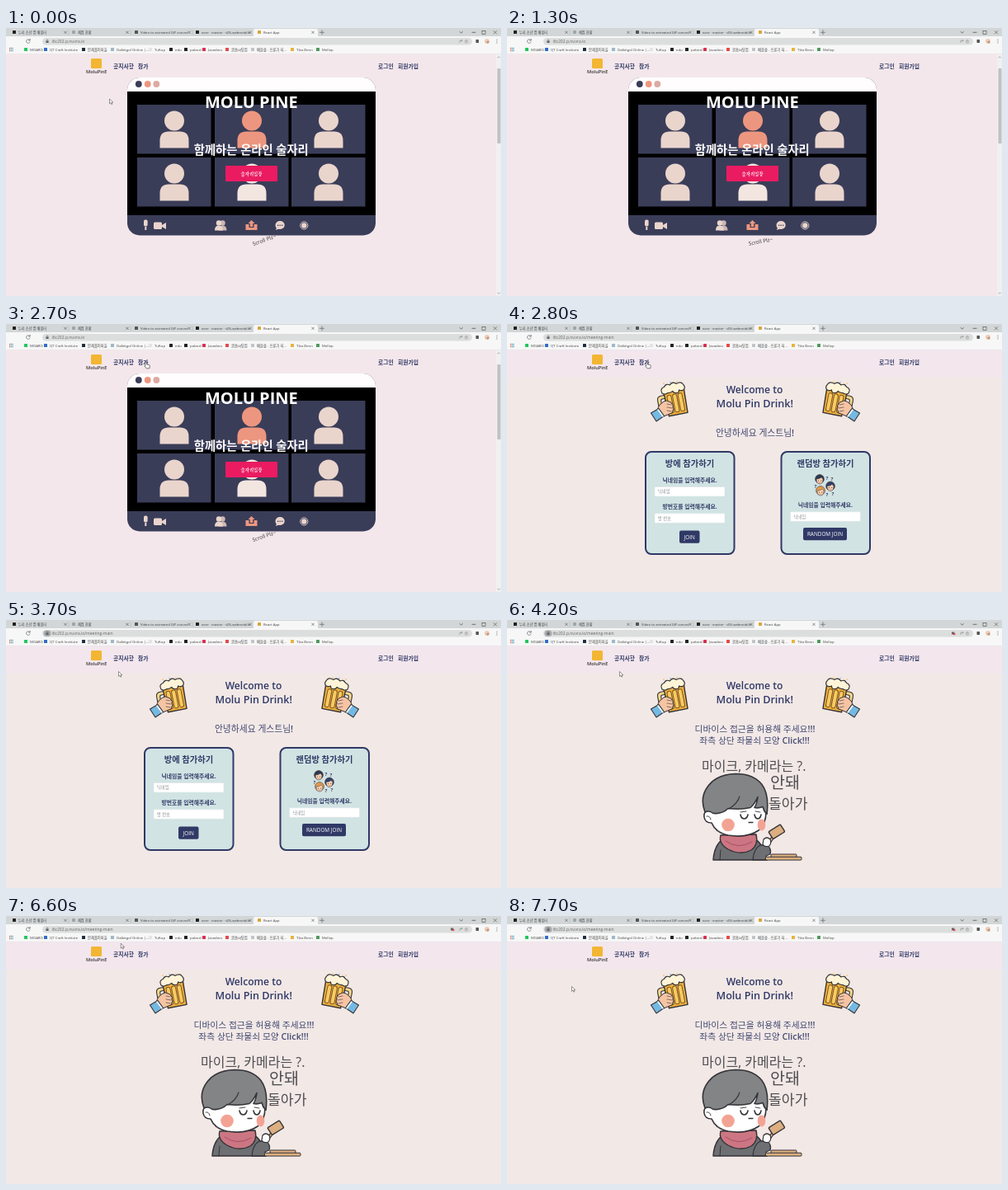
Write an HTML page that moves like this. It is 600 by 325 pixels and loops after 8 s.

```html
<!DOCTYPE html>
<html lang="ko">
<head>
<meta charset="utf-8">
<title>Online party</title>
<style>
html, body { margin: 0; width: 100%; height: 100%; overflow: hidden; background: #f4e7ea; }
svg { display: block; width: 600px; height: 325px; }
text { font-family: "Open Sans", "Noto Sans CJK KR", "Noto Sans CJK JP", "Noto Sans CJK", sans-serif; }
.m { text-anchor: middle; }
.b { font-weight: 700; }
.s { font-weight: 600; }
.line { fill: none; stroke-linecap: round; stroke-linejoin: round; }
</style>
</head>
<body>
<svg id="stage" viewBox="0 0 600 325"></svg>
<script>
const NAVY = '#303966', SLATE = '#3a3d58', SKIN = '#ead5cd', CORAL = '#ed967f', INK = '#353438';

const rect = (x, y, w, h, fill, r = 0, more = '') =>
  `<rect x="${x}" y="${y}" width="${w}" height="${h}" rx="${r}" fill="${fill}" ${more}/>`;
const dot = (x, y, r, fill, more = '') => `<circle cx="${x}" cy="${y}" r="${r}" fill="${fill}" ${more}/>`;
const text = (x, y, size, fill, str, cls = '', more = '') =>
  `<text x="${x}" y="${y}" font-size="${size}" fill="${fill}" class="${cls}" ${more}>${str}</text>`;
const shape = (d, fill, stroke = 'none', w = 1) =>
  `<path d="${d}" fill="${fill}" stroke="${stroke}" stroke-width="${w}" stroke-linejoin="round"/>`;
const line = (d, stroke = '#5f6368', w = .7) =>
  `<path class="line" d="${d}" stroke="${stroke}" stroke-width="${w}"/>`;
const cross = (x, y, r = 1.5) => line(`M${x - r} ${y - r}l${2 * r} ${2 * r}m0 ${-2 * r}l${-2 * r} ${2 * r}`);

function browser() {
  const tabs = [
    [10, '누리 소년 앱 배움터', '#222', 72], [82, '채점 현황', '#9aa', 147],
    [158, 'Video to animated GIF conver', '#555', 222], [232, 'exec · master · s06-webmobile', '#222', 296],
    [307, 'React App', '#d9a441', 372]
  ];
  const marks = [
    [24, 'MOARO', '#1ec85a'], [48, 'QT Craft Institute', '#2d6fc4'], [94, '문제풀이마을', '#222b3d'],
    [129, 'Dalbitgol Online |…', '#9fb6c4'], [175, 'Tuftup', '#e4e4e4'], [200, 'edu', '#222'],
    [218, 'pobnel', '#222'], [240, 'Javadocs', '#d9304f'], [268, '글솜씨닷컴', '#e34848'],
    [299, '배움숲 - 프론기 되…', '#bfc4c8'], [347, 'Tiko Benn', '#e8b33c'], [378, 'Mellop', '#4d9a5b']
  ];
  let s = rect(0, 0, 600, 11, '#d3d6d6') + rect(0, 10, 600, 21.5, '#f7f7f7') + rect(300, 1, 78, 11, '#f7f7f7', 2);
  for (const [x, name, color, end] of tabs)
    s += rect(x - 2, 3, 4, 4, color, .5) + text(x + 5, 7.1, 4.2, '#3c4043', name) + cross(end, 5.3, 1.3);
  for (const x of [76, 151, 226]) s += line(`M${x} 3v5`, '#a8adad', .5);
  s += line('M380.5 5.3h5m-2.5-2.5v5') + line('M550 4.5l1.7 1.7 1.7-1.7M565 5.3h4', '#444');
  s += rect(577, 3.3, 4, 4, 'none', 0, 'stroke="#444" stroke-width=".6"') + cross(593, 5.3, 1.8);
  s += line('M29 14.7a2.4 2.4 0 1 0 .2 2.3m0-3.7v1.8h-1.8');
  s += rect(44, 12, 521, 8.5, '#dcdddd', 4.2);
  s += `<g id="pressed">${rect(45.5, 12.5, 9, 7.5, '#a9abac', 3.7)}</g>`;
  s += rect(48.4, 15.4, 3.2, 2.7, '#5f6368', .4) + line('M49 15.3v-.7q1-1.6 2 0v.7', '#5f6368', .5);
  s += `<text id="url" x="55.5" y="18" font-size="5" fill="#666"></text>`;
  s += line('M550 17.5v-2.2h3m-1-1l1 1-1 1', '#777', .5) + line('M558 14.3l.6 1.3 1.4.2-1 1 .2 1.4-1.2-.7-1.2.7.2-1.4-1-1 1.4-.2z', '#777', .4);
  s += `<g id="blocked">${rect(539, 14.6, 3.3, 3, '#666', .5)}${dot(542.2, 17, 1.3, '#e2444d')}</g>`;
  s += rect(569.5, 14, 3.5, 4, '#555', .6) + dot(583, 16, 3, '#e9cdbb') + dot(584, 17, 1.5, '#c98d72');
  for (const y of [14, 16, 18]) s += dot(595, y, .5, '#555');
  for (let i = 0; i < 9; i++)
    s += rect(4 + i % 3 * 1.7, 23.8 + (i / 3 | 0) * 1.7, 1.1, 1.1, ['#e55', '#4a8', '#48c'][i % 3]);
  for (const [x, name, color] of marks)
    s += rect(x - 2, 24, 4, 4, color, .5) + text(x + 5, 28, 4.3, '#444', name);
  return s + line('M0 31.3h600', '#dedede', .5);
}

function nav() {
  return rect(103, 37, 13, 12, '#f2b632', 1.5) + text(109.7, 55.2, 5.6, '#333', 'MoluPinE', 'm s') +
    text(130, 48.6, 6.8, NAVY, '공지사항', 'b') + text(160, 48.6, 6.8, NAVY, '참가', 'b') +
    text(451, 48.6, 6.8, NAVY, '로그인', 'b') + text(475, 48.6, 6.8, NAVY, '회원가입', 'b');
}

function person(x, y, fill) {
  return dot(x, y, 12, fill) +
    shape(`M${x - 17.5} ${y + 33}v-9q0-11 11-11h13q11 0 11 11v9z`, fill);
}

function home() {
  let s = rect(0, 31.5, 600, 294, '#f4e7eb') + rect(594, 31.5, 6, 294, '#f1f0f1') + rect(595.5, 49, 4, 91, '#c1c1c3');
  s += line('M596 36l1.3-1.3 1.3 1.3M596 321l1.3 1.3 1.3-1.3', '#777', .6);
  s += rect(147, 60, 301, 191.5, SLATE, 15) + shape('M147 77v-2a15 15 0 0 1 15-15h271a15 15 0 0 1 15 15v2z', '#fffdfd');
  s += rect(147, 77, 301, 150, '#000');
  s += dot(160.8, 68, 3.9, SLATE) + dot(171.7, 68, 3.9, CORAL) + dot(182.3, 68, 3.9, '#dbaaa3');
  [159, 253, 346].forEach((x, col) => [93, 157].forEach((y, row) => {
    s += rect(x, y, 89.5, 59.5, SLATE) + person(x + 45, y + 19.5, col === 1 ? (row ? '#f3e6e1' : CORAL) : SKIN);
  }));
  s += text(297.3, 96.7, 20, '#fff', 'MOLU PINE', 'm b') + text(297.3, 153.2, 14.3, '#fff', '함께하는 온라인 술자리', 'm b');
  s += rect(266, 167, 63, 19, '#ea1b61') +
    text(297.5, 178.6, 5.4, '#fff', '술자리입장', 'm b', `style="font-family:'Noto Serif CJK KR','Noto Serif',serif"`);
  // toolbar
  s += rect(167, 232.5, 4.6, 8, SKIN, 1.8) + rect(168.3, 241, 2, 4, SKIN);
  s += rect(179, 235.5, 10, 8.5, SKIN, 1.5) + shape('M189 239l5-3v8l-5-3z', SKIN);
  for (const [x, fill] of [[262.5, '#cdb7b3'], [258, SKIN]])
    s += dot(x, 236.5, 3.2, fill) + shape(`M${x - 5} 245.5q0-6 5-6t5 6z`, fill);
  s += shape('M290.5 238h4v4h6v-4h4v7h-14z', CORAL) + shape('M297.5 233l4 4h-2.3v4h-3.4v-4h-2.3z', CORAL);
  s += shape('M326.5 239a5.6 5 0 1 1 4 4.8l-3.5 1.3.8-2.6a5 5 0 0 1-1.3-3.5z', SKIN);
  for (const x of [329.7, 332.2, 334.7]) s += dot(x, 239.3, .8, SLATE);
  s += dot(361.3, 239.5, 4.6, 'none', `stroke="${SKIN}" stroke-width=".9"`) + dot(361.3, 239.5, 3.2, SKIN);
  return s + `<g id="hint">${text(0, 2, 6.4, '#333', 'Scroll Plz~', 'm')}</g>`;
}

function mug() {
  // bubbles, then the tilted glass, then the hand on its handle
  let s = dot(190, 72, .8, '#f0b73f') + dot(198, 70.5, .8, '#74b9e2') + dot(206, 70, .8, '#f0b73f');
  s += '<g transform="translate(204 93) rotate(-11)">';
  s += shape('M-11-9h-5q-5 0-5 5v11q0 5 5 5h5v-4h-4q-2 0-2-2v-9q0-2 2-2h4z', '#f4d68b', INK, 1.1);
  s += shape('M-12-14h25l-1 31h-23z', '#efb03c', INK, 1.4);
  for (const x of [-9, -2.3, 4.4]) s += rect(x, -8, 5, 22, '#f9cb61', 2.2, 'stroke="#7b5426" stroke-width="1"');
  s += shape('M-14-12q-2-6 4-7 3-4 7-1 4-4 8 0 6-2 8 2 3 5-1 7-3 1-5-1-1 4-4 3-3 0-4-3-3 2-6 1-4 2-7-1z', '#fff4d7', INK, 1.2);
  s += '</g>';
  s += shape('M182 104q2-7 8-10 4-2 6 0 3 0 4 3 2 1 1 4 2 2 0 4 0 4-4 4l-7 3z', '#f6c4a3', INK, 1);
  s += line('M194 97l5 1m-5 3l6 1m-6 3l5 1', INK, .6);
  return s + shape('M174.500 108l9.500-5.500 6.500 9-9.500 6.500z', '#74b9e2', INK, 1.1) + line('M183 104l6 8', '#fff', 1.4);
}

function meeting() {
  return rect(0, 31.5, 600, 294, '#f2e8e6') + rect(0, 31.5, 600, 33, '#f3e6ed') +
    mug() + `<g transform="translate(602) scale(-1 1)">${mug()}</g>` +
    text(300, 83.5, 12.1, NAVY, 'Welcome to', 'm s') + text(300.3, 101.2, 12.6, NAVY, 'Molu Pin Drink!', 'm s');
}

const input = (x, y, hint) => rect(x, y, 85, 11.5, '#fff', 1, 'stroke="#dde5e6" stroke-width=".6"') +
  text(x + 4, y + 7.8, 5.3, '#8b8f94', hint);
const card = (x, title) => rect(x + 1, 155, 107.5, 124, '#d1e3e3', 7, `stroke="${NAVY}" stroke-width="2"`) +
  text(x + 54.5, 173, 10.3, NAVY, title, 'm b');
const ask = (x, y, str) => text(x, y, 6.8, NAVY, str, 'm b');
const button = (x, y, w, str) => rect(x, y, w, 15.3, NAVY, 2) + text(x + w / 2, y + 10, 6.4, '#fff', str, 'm');

function face(x, y, hair) {
  return dot(x, y - 1, 5.4, hair, `stroke="${INK}" stroke-width=".6"`) +
    shape(`M${x - 4} ${y - 1}q4 0 6-2l2 2q0 6-4 6t-4-6z`, '#f8ceb0', INK, .5) +
    dot(x - 1.5, y + 1, .5, INK) + dot(x + 1.7, y + 1, .5, INK) + line(`M${x - 1} ${y + 3.2}h2`, '#b65549', .5);
}

function join() {
  let s = text(300.5, 135.5, 10.8, '#434a72', '안녕하세요 게스트님<tspan class="s">!</tspan>', 'm');
  s += card(167, '방에 참가하기') + ask(221.5, 191.6, '닉네임을 입력해주세요.') + input(179, 197.5, '닉네임') +
    ask(221.5, 224.4, '방번호를 입력해주세요.') + input(179, 229.8, '방 번호') + button(209, 250.5, 24.5, 'JOIN');
  s += card(331.5, '랜덤방 참가하기');
  s += face(379, 189, '#2e3850') + face(392, 197.5, '#34406b') + face(380, 203, '#e59b4c');
  for (const [x, y] of [[388, 189], [394, 190], [374, 199], [388, 209], [395, 208]]) s += text(x, y, 6, NAVY, '?', 'm b');
  return s + ask(385.8, 222, '닉네임을 입력해주세요.') + input(343.5, 227.8, '닉네임') + button(359, 247, 53, 'RANDOM JOIN');
}

function denied() {
  const pen = '#4e4e51', shirt = '#6e6f72', tan = '#dcae80', soft = '#434a72';
  let s = text(300.5, 135.8, 10.75, soft, '디바이스 접근을 허용해 주세요<tspan class="s">!!!</tspan>', 'm') +
    text(300, 150, 10.75, soft, '좌측 상단 좌물쇠 모양 <tspan class="s">Click!!!</tspan>', 'm');
  s += text(236, 182.8, 16, pen, '마이크, 카메라는 ?.') + text(319, 204, 19.5, pen, '안돼') + text(317, 228.5, 17.2, pen, '돌아가');
  // body and scarf
  s += shape('M250 291q1-17 11-25h40q9 5 14 25z', shirt, INK, 1.5) + line('M259 279l-1 12', INK, 1);
  s += shape('M259 261q-3 10 9 17 15 8 28 1 9-6 6-19z', '#cd7683', INK, 1.4) + line('M265 268q15 11 32 1', '#a74f62', 1);
  // head
  s += shape('M246 231q-8 0-7 8 1 7 9 7 5 12 20 15 23 4 37-6 9-7 9-23l-2-22-50-4-15 10z', '#fff', INK, 1.6);
  s += line('M242 238q4-1 5 4', INK, .9);
  s += dot(268, 248.5, 7.8, '#f3a394') + `<ellipse cx="308.500" cy="248.500" rx="4.800" ry="7" fill="#f3a394"/>`;
  s += shape('M240 233q-7-18 4-32 11-14 33-14.500 22 0 32 13 9 12 6 36-4-4-5-9-5 2-10 1 3-5 4-13-4 9-9 13-12 3-27 1-7 7-18 6-5-4-10-1.500z', '#838486', INK, 1.6);
  s += line('M282 214q-3 9-13 15', INK, 1.1);
  s += line('M283 236q1 5 4.500 5t4.500-5m8 0q1 5 4 5t4-5', INK, 1.6) + line('M283 233l7-1m11 0l6 1', INK, .9) + line('M293 245.5h5', INK, 1.3);
  // arm, gavel and block
  s += shape('M298 291q1-14 9-18l8 0q6 4 4 11l-5 2 1 5z', shirt, INK, 1.3);
  s += line('M325 260l-9 12', INK, 4) + line('M325 260l-9 12', tan, 2);
  s += `<g transform="rotate(-32 327 257)">${rect(318.5, 251.500, 17, 10.500, tan, 1.5, `stroke="${INK}" stroke-width="1.400"`)}</g>`;
  s += shape('M311 266q4-4 8 0 2 4-1 8-6 2-8-2z', '#fff', INK, 1.2);
  return s + rect(320, 284, 31, 5, tan, 1, `stroke="${INK}" stroke-width="1"`) + rect(313.5, 287.3, 43.5, 3.8, tan, 1, `stroke="${INK}" stroke-width="1"`);
}

const arrow = shape('M0 0v5.800l1.400-1.200 1 2.100 1-.5-1-2h1.900z', '#fff', '#333', .5);
const hand = shape('M1.200 0q1 0 1 1v2l3 .7q1 .4.700 1.600l-.6 2.500h-3.600l-2.200-2.800q0-1 1-.6l-.1-3.400q0-1 .8-1z', '#fff', '#222', .6);
const $ = id => document.getElementById(id);
$('stage').innerHTML = `<g id="home">${home()}</g><g id="meeting">${meeting()}<g id="join">${join()}</g>` +
  `<g id="denied">${denied()}</g></g>${nav()}${browser()}<g id="cursor"><g id="arrow">${arrow}</g><g id="hand">${hand}</g></g>`;

// time, x, y of the pointer tip; it leaves over the top edge for a moment
const path = [
  [0, 125.5, 86], [200, 126, 86], [900, 150, -9], [1800, 160, -9], [2200, 170, 46.5],
  [2700, 168.5, 46], [3000, 168, 46], [3600, 136.5, 62.5], [4500, 136.5, 62.5], [5200, 505, 59],
  [5600, 516.5, 58], [5900, 380, 118], [6200, 236, 66], [6300, 230, 54], [6800, 90, 22], [7100, 49, 15],
  [7300, 50, 24], [7700, 78.5, 85.5], [8000, 78.5, 85.5]
];
function pointer(t) {
  const i = path.findIndex(p => p[0] > t), [a, x, y] = path[i - 1], [b, u, v] = path[i];
  const k = (t - a) / (b - a), e = k * k * (3 - 2 * k);
  return [x + (u - x) * e, y + (v - y) * e];
}
const show = (id, on) => $(id).setAttribute('display', on ? 'inline' : 'none');

function draw(now) {
  const t = Math.floor(now % 8000 / 100) * 100, inside = t >= 2800, refused = t >= 4200;
  show('home', !inside);
  show('meeting', inside);
  show('join', !refused);
  show('denied', refused);
  show('blocked', refused);
  show('pressed', t >= 3000 && t < 4600 || t >= 7100);
  $('url').textContent = 'i6c202.p.nuvra.io' + (inside ? '/meeting-main' : '');
  const sway = Math.cos(t / 2600 * 2 * Math.PI);
  $('hint').setAttribute('transform', `translate(${310.3 + 2.8 * sway} ${258.2 - .8 * sway}) rotate(${-15 - 4 * sway})`);
  const [x, y] = pointer(t), link = x > 160 && x < 174 && y > 40 && y < 52 && t < 3400;
  $('cursor').setAttribute('transform', `translate(${x} ${y})`);
  show('arrow', !link);
  show('hand', link);
  requestAnimationFrame(tick);
}
const start = performance.now();
const tick = () => draw(performance.now() - start);
tick();
</script>
</body>
</html>
```
